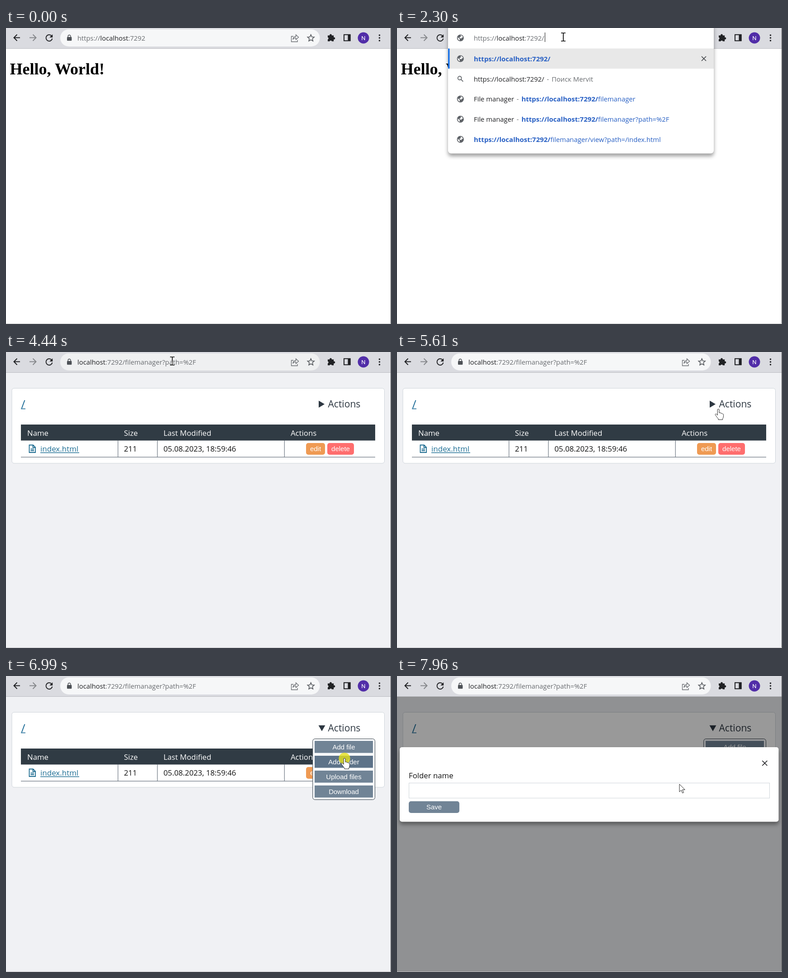
An HTML page for the animation above (8000 ms loop, 852 by 657 pixels).

```html
<!DOCTYPE html>
<html lang="en">
<head>
<meta charset="utf-8">
<title>File manager demo</title>
<style>
  html, body { margin: 0; width: 100%; height: 100%; overflow: hidden; background: #fff; }
  svg { display: block; width: 852px; height: 657px; isolation: isolate; }
  text { font-family: "Open Sans", "Noto Sans", sans-serif; font-size: 14.8px; fill: #202124; white-space: pre; }
  .body text { font-size: 16.8px; fill: #111; }
  .body .head { fill: #fff; }
  .body .big { font-size: 21.1px; fill: #2c3640; }
  .body .btn { font: 15px "Liberation Sans", Arial, sans-serif; fill: #fff; text-anchor: middle; }
  .hello { font: bold 36px "Liberation Serif", "Times New Roman", serif; fill: #000; }
  .dim { fill: #696c70; }
  .link { fill: #2860c4; }
  .b { font-weight: 700; font-size: 15px; }
  .line { fill: none; stroke: #202124; stroke-width: 2; }
  #popup, #sheet { filter: drop-shadow(0 6px 4.5px rgba(0, 0, 0, .38)); }
  #beam { mix-blend-mode: difference; }
</style>
</head>
<body>
<svg viewBox="0 0 852 657">
  <defs>
    <g id="globe">
      <circle r="7.6" fill="#5f6368"/>
      <path d="M-5.8-1.5 -1.5 2.2v3.4C-4.5 5-6 2-5.8-1.5ZM.8-5.9C3.2-5.4 5-3.8 5.7-1.6L3.2-.6 2.4 1.2-1.6.7-2-1.4.6-2.2Z" fill="#fff"/>
    </g>
    <g id="glass" fill="none" stroke="#5f6368" stroke-width="1.7">
      <circle cx="-1.6" cy="-1.6" r="4"/><path d="M1.4 1.4 6 6"/>
    </g>
    <path id="cross" d="M-5-5 5 5M5-5-5 5"/>
  </defs>

  <g id="hello">
    <rect width="852" height="657" fill="#fff"/>
    <text class="hello" x="8.6" y="103">Hello, World!</text>
  </g>

  <g id="manager" class="body">
    <rect width="852" height="657" fill="#f0f1f4"/>
    <rect x="13" y="80.5" width="824.5" height="166.5" rx="5" fill="#fff" stroke="#ced4da"/>
    <text x="33.5" y="125" style="font-size:25px;fill:#1b6a96">/</text>
    <path d="M33 126.2h10" stroke="#1b6a96" stroke-width="1.5"/>
    <path id="marker" fill="#2c3640"/>
    <text class="big" x="712.5" y="123">Actions</text>
    <rect x="33" y="161" width="784" height="35.5" fill="#303b44"/>
    <path d="M33 233.3H817M247.8 196V233M335 196V233M616.2 196V233" stroke="#6b7580" stroke-width="1.2"/>
    <text class="head" x="47" y="186">Name</text>
    <text class="head" x="261" y="186">Size</text>
    <text class="head" x="348.5" y="186">Last Modified</text>
    <text class="head" x="630" y="186">Actions</text>
    <path d="M51.5 206.5h8.5l5 5v11.5h-13.5ZM59.5 206.5v5.5h5M54.5 215.5h7.5M54.5 219h7.5" fill="none" stroke="#1b6a8f" stroke-width="1.8"/>
    <text x="76" y="221" style="font-size:17px;font-weight:500;fill:#1f6f95">index.html</text>
    <path d="M76 223.5h86" stroke="#1f6f95" stroke-width="1.5"/>
    <text x="261" y="221">211</text>
    <text x="348.5" y="221">05.08.2023, 18:59:46</text>
    <rect x="664" y="202" width="42" height="26" rx="5" fill="#ef9a53"/>
    <text class="btn" x="685" y="220">edit</text>
    <rect x="711" y="202" width="59" height="26" rx="5" fill="#ff6e6e"/>
    <text class="btn" x="740.5" y="220">delete</text>
    <g id="menu">
      <rect x="678.7" y="139.5" width="137.8" height="135" rx="5" fill="#f8fafc" stroke="#303b44"/>
    </g>
  </g>

  <g id="dialog" class="body">
    <rect y="46" width="852" height="611" opacity=".4"/>
    <rect id="sheet" x="6" y="158" width="838.5" height="165.5" rx="5" fill="#fff"/>
    <use href="#cross" x="813.8" y="193.5" transform="translate(-81.38 -19.35) scale(1.1)" stroke="#202124" stroke-width="1.6"/>
    <text x="26" y="227">Folder name</text>
    <rect x="26.5" y="237.5" width="798" height="33.5" fill="#fff" stroke="#ced4da"/>
    <rect x="26" y="278" width="112" height="26" rx="5" fill="#718496"/>
    <text class="btn" x="82" y="296">Save</text>
  </g>

  <g id="toolbar">
    <rect width="852" height="46" fill="#dadbe0"/>
    <rect y="45" width="852" height="1" fill="#b9babf"/>
    <path class="line" d="M31 21.5H18M24.5 14.5l-7 7 7 7"/>
    <path class="line" d="M52 21.5h13M59.5 14.5l7 7-7 7" style="stroke:#85878b"/>
    <path class="line" d="M101 17.6A7 7 0 1 0 102.4 23.5"/>
    <path d="M103.2 14v7h-7Z" fill="#202124"/>
    <rect id="pill" x="120" y="3" width="574.5" height="38" rx="19"/>
    <rect x="135" y="20" width="10.4" height="8.3" rx="1.2" fill="#4d5156"/>
    <path d="M137.3 20.5v-2a2.9 2.9 0 0 1 5.8 0v2" fill="none" stroke="#4d5156" stroke-width="1.5"/>
    <path d="M636 18.5h-4.5V30.5h13.5V26.5M634.8 25.5c.6-4.6 3.2-6.4 6.7-6.5v-4l6 5.5-6 5.3v-3.7c-3 0-5 .9-6.7 3.4Z" fill="none" stroke="#686b70" stroke-width="1.3"/>
    <path id="star" fill="none" stroke="#55585d" stroke-width="1.6"/>
    <path d="M712 16.5h4.2a2.4 2.4 0 1 1 4.6 0h4.4v4.2a2.4 2.4 0 1 1 0 4.6V29.5h-4.2a2.4 2.4 0 0 0-4.6 0H712v-4.2a2.4 2.4 0 0 0 0-4.6Z" fill="#202124"/>
    <rect x="748" y="14.8" width="13.5" height="13.5" class="line"/>
    <rect x="756.5" y="14" width="6" height="15" fill="#202124"/>
    <circle cx="791" cy="22" r="12.5" fill="#512da8"/>
    <text x="791" y="26.8" text-anchor="middle" style="font:13px Roboto,sans-serif;fill:#fff">N</text>
    <g fill="#202124"><circle cx="826.5" cy="16" r="1.8"/><circle cx="826.5" cy="22" r="1.8"/><circle cx="826.5" cy="28" r="1.8"/></g>
    <text id="url" x="158" y="27.5"></text>
  </g>

  <g id="popup"></g>
  <rect id="caret" y="10" width="1" height="21" fill="#111"/>
  <path d="M851.5 0V657" stroke="#5a5a5c"/>
  <path d="M0 656.5H852" stroke="#bdbdbf"/>

  <circle id="press" r="12.7" fill="#e4e01c" opacity=".8"/>
  <path id="beam" d="M-5-9h4l1 1 1-1h4M-5 9h4l1-1 1 1h4M0-8V8" fill="none" stroke="#fff" stroke-width="1.7"/>
  <path id="hand" d="M-1.8 1.5a1.9 1.9 0 0 1 3.8 0v6.5c3-.6 4 .3 4.2 1.2 2-.3 3 .4 3.2 1.3 1.6-.2 2.2.8 2.2 2.2 0 5-1 7-2 8.5v2H0v-2c-2-2-4-5-6.5-8.5-1-1.6 1-3.2 2.6-1.8l2.1 2.3Z" fill="#fff" stroke="#222"/>
  <path id="arrow" d="M0 0V17.2L4 13.4 6.8 19.8 9.4 18.7 6.7 12.4H12.2Z" fill="#fff" stroke="#222"/>
</svg>

<script>
const LOOP = 8000, FRAME = 50;
const HOST = 'https://localhost:7292/', WORD = 'filemanager';
const $ = id => document.getElementById(id);
const show = (id, on) => { $(id).style.display = on ? '' : 'none'; };
const span = (text, cls = '', dx = 0) => `<tspan class="${cls}" dx="${dx}">${text}</tspan>`;
const address = (scheme, rest) => span(scheme, 'dim') + span('localhost') + span(rest, 'dim');
const within = (t, from, to) => t >= from && t < to;

// [time, x, y]
const path = [
  [0, 880, 690], [890, 880, 690], [900, 815, 640], [1130, 560, 260], [1330, 363.5, 26], [1420, 363.5, 26],
  [1590, 368, 20], [4480, 368, 20], [4800, 345, 57], [5080, 345, 57], [5450, 686, 158],
  [5600, 711, 127], [5850, 726, 119], [6520, 726, 119], [6930, 749, 183], [7240, 749, 183],
  [7500, 690, 222], [7750, 612, 236], [7940, 625, 240], [LOOP, 625, 240]
];
const presses = [[1490, 1600], [5920, 6120], [6940, 7040]];
// [time, typed letters, start of the completed part]
const typing = [[2250, '', 0], [3010, 'f', 330.6], [3270, 'fi', 334.5], [3430, 'fil', 338.5]];
const labels = ['Add file', 'Add folder', 'Upload files', 'Download'];

$('menu').innerHTML += labels.map((label, i) =>
  `<rect class="item" x="683" y="${144 + i * 33}" width="129" height="26.7"/>
   <text class="btn" x="747.5" y="${162.5 + i * 33}">${label}</text>`).join('');
const items = [...document.querySelectorAll('.item')];

$('star').setAttribute('d', 'M' + Array.from({ length: 10 }, (_, i) => {
  const a = i * Math.PI / 5, r = i % 2 ? 3.6 : 7.8;
  return `${674.7 + r * Math.sin(a)} ${22.6 - r * Math.cos(a)}`;
}).join('L') + 'Z');

function popupMarkup(typed, start) {
  const rest = WORD.slice(typed.length);
  const dash = span(' - ', 'dim', 2);
  const link = tail => span(HOST + typed, 'link b') + span(rest + tail, 'link');
  const title = span('File'.slice(0, typed.length), 'b') + span('File manager'.slice(typed.length)) +
    dash + span('', '', 2);
  const titled = tail => title + span(HOST + typed, 'link b', 2) + span(rest + tail, 'link');
  const search = span(HOST + typed) + dash + span('Поиск Mervit', 'dim', 2);
  const rows = [titled(''), search, titled('?path=%2F'), link('/view?path=/index.html')];
  if (!typed) rows.splice(0, 2, span(HOST, 'link b'), search, titled(''));
  const list = rows.map((row, i) => {
    const y = 68 + i * 44.8;
    return `<use href="#${row === search ? 'glass' : 'globe'}" x="140.3" y="${y}"/>
      <text x="170" y="${y + 5.7}">${row}</text>`;
  }).join('');
  const picked = typed ? `<rect x="${start}" y="9.5" width="${409 - start}" height="25" fill="#526586"/>
    <text x="${start}" y="27.5" style="fill:#fff">${rest}</text>` : '';
  return `<rect x="113" y="-10" width="588" height="${64.5 + rows.length * 44.8}" rx="7" fill="#fff"/>
    <rect x="113" y="45.5" width="588" height="44.8" fill="#e8e8e8"/>
    <rect x="113" y="45.5" width="3.5" height="44.8" rx="1" fill="#1a73e8"/>
    <use href="#cross" x="679" y="68" stroke="#45484c" stroke-width="1.7"/>
    <use href="#globe" x="140.3" y="22"/>
    <text x="170" y="27.5">${address('https://', ':7292/' + typed)}</text>${picked}${list}`;
}

function pointer(t) {
  const i = path.findIndex((p, n) => n && t < p[0]);
  const [a, b] = [path[i - 1], path[i]];
  const k = (t - a[0]) / (b[0] - a[0]);
  return [a[1] + (b[1] - a[1]) * k, a[2] + (b[2] - a[2]) * k];
}

const written = {};
function setMarkup(id, markup) {
  if (written[id] !== markup) $(id).innerHTML = written[id] = markup;
}

function draw(t) {
  const [x, y] = pointer(Math.floor(t / FRAME) * FRAME);
  const open = t >= 5920, modal = t >= 7040;
  const focused = within(t, 1490, 3690), suggesting = within(t, 2250, 3690);

  show('hello', t < 3750);
  show('manager', t >= 3750);
  show('menu', open);
  show('dialog', modal);
  $('marker').setAttribute('d', open ? 'M691.5 109.5h15l-7.5 13Z' : 'M692 108v15.5l13-7.75Z');
  items.forEach((item, i) => {
    const over = !modal && within(y, 144 + i * 33, 171 + i * 33);
    item.setAttribute('fill', over ? '#5d7389' : '#718496');
  });

  const kind = y < 42 ? 'beam' : !modal && x > 690 && (y < 139 || open) ? 'hand' : 'arrow';
  const hovered = kind === 'beam' && !within(t, 3690, 4440);
  $('pill').setAttribute('fill', focused ? '#fff' : hovered ? '#eff0f1' : '#f6f7f8');
  $('pill').setAttribute('stroke', focused ? '#1a73e8' : 'none');
  $('pill').setAttribute('stroke-width', 2);
  setMarkup('url', t < 3690 ? address('https://', ':7292') : address('', ':7292/filemanager?path=%2F'));

  show('popup', suggesting);
  if (suggesting) {
    const [, typed, start] = typing.filter(s => s[0] <= t).pop();
    setMarkup('popup', popupMarkup(typed, start));
  }
  show('caret', within(t, 1490, 1940) || within(t, 2250, 2620));
  $('caret').setAttribute('x', suggesting ? 327 : 309);

  show('press', presses.some(p => within(t, ...p)));
  for (const id of ['press', 'beam', 'hand', 'arrow']) {
    $(id).setAttribute('transform', `translate(${x} ${y})`);
    if (id !== 'press') show(id, id === kind);
  }
}

const began = performance.now();
function tick() {
  draw((performance.now() - began) % LOOP);
  requestAnimationFrame(tick);
}
tick();
</script>
</body>
</html>
```
